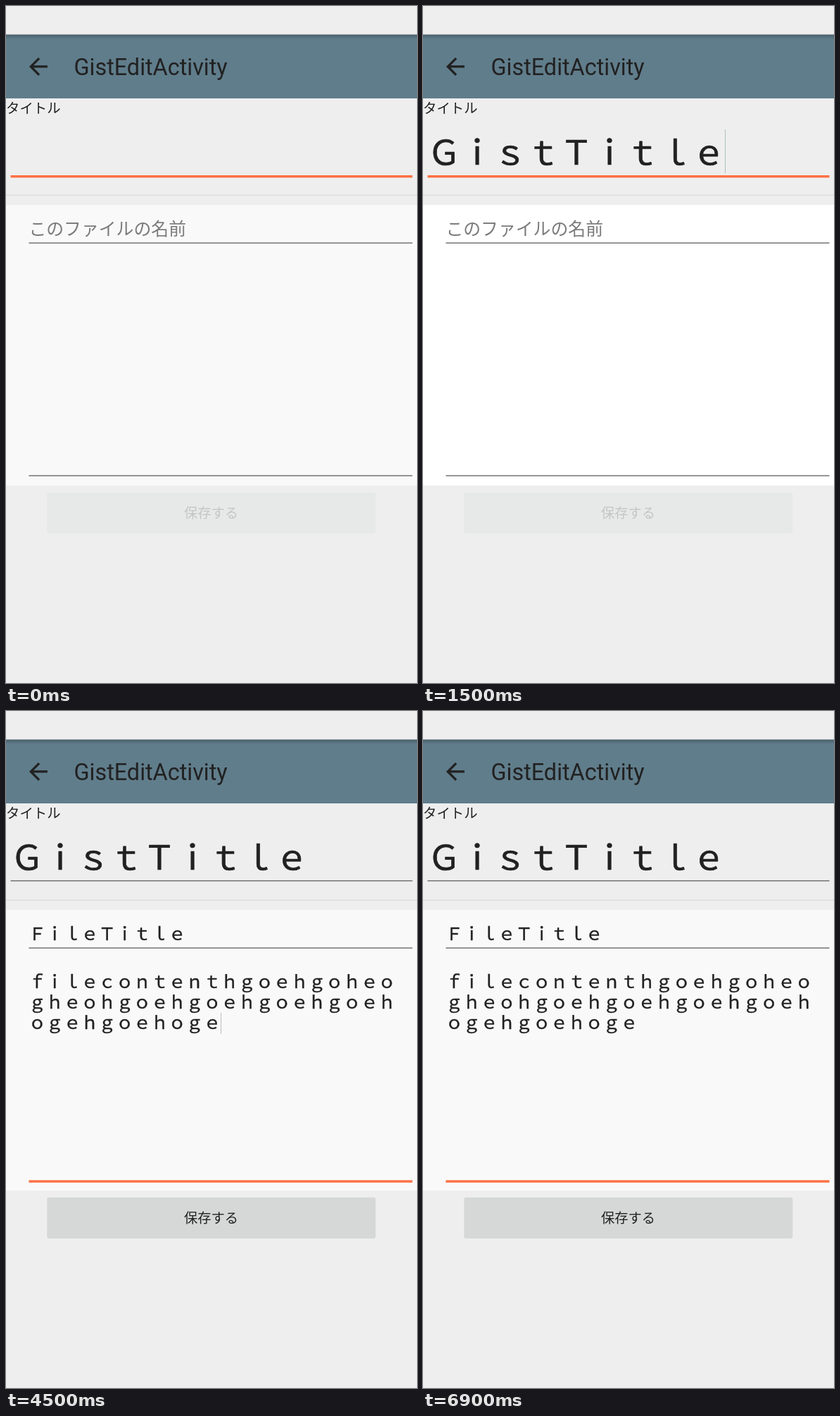
Animation, 584 px wide and 960 px high, one loop 7500 ms. Source, as an HTML page with a canvas:

```html
<!DOCTYPE html>
<html lang="ja">
<head>
<meta charset="utf-8">
<title>GistEditActivity</title>
<style>
html, body { margin: 0; width: 100%; height: 100%; overflow: hidden; background: #eee; }
canvas { display: block; }
</style>
</head>
<body>
<canvas id="stage" width="584" height="960"></canvas>
<script>
const ctx = document.getElementById('stage').getContext('2d');
const STEP = 1500;
const INK = '#212121', ACCENT = '#ff7043', RULE = '#747474';
const CJK = '"Noto Sans CJK JP", "Noto Sans CJK", sans-serif';
const BODY = ['filecontenthgoehgoheo', 'gheohgoehgoehgoehgoeh', 'ogehgoehoge'];

// Each step: focused field, caret box and card colour
const STEPS = [
  { focus: 'title', card: '#f9f9f9' },
  { focus: 'title', card: '#ffffff', title: true, caret: [429, 175, 62, '#adc0bb'] },
  { focus: 'file', card: '#ffffff', title: true, file: true, caret: [255, 298, 34, '#bdbdbd'] },
  { focus: 'body', card: '#f9f9f9', title: true, file: true, body: true, caret: [305, 428, 30, '#bdbdbd'] },
  { focus: 'body', card: '#f9f9f9', title: true, file: true, body: true }
];

function rect(x, y, w, h, color) {
  ctx.fillStyle = color;
  ctx.fillRect(x, y, w, h);
}

function text(str, x, y, size, color = INK, family = CJK) {
  ctx.font = `${size}px ${family}`;
  ctx.fillStyle = color;
  ctx.fillText(str, x, y);
}

// Typed letters are full-width, with slightly rounded strokes
function typed(str, x, y, size) {
  const wide = str.replace(/[!-~]/g, c => String.fromCharCode(c.charCodeAt(0) + 0xfee0));
  text(wide, x, y, size);
  ctx.strokeStyle = INK;
  ctx.lineJoin = 'round';
  ctx.lineWidth = size * 0.015;
  ctx.strokeText(wide, x, y);
}

function underline(x, y, focused) {
  rect(x, y, 577.5 - x, focused ? 3.4 : 1.5, focused ? ACCENT : RULE);
}

function appBar() {
  rect(0, 40.5, 584, 90.5, '#607d8b');
  const shade = ctx.createLinearGradient(0, 40, 0, 47);
  shade.addColorStop(0, 'rgba(0,0,0,.25)');
  shade.addColorStop(1, 'rgba(0,0,0,0)');
  rect(0, 40.5, 584, 6.5, shade);

  ctx.save();
  ctx.translate(26.5, 66.5);
  ctx.scale(1.622, 1.622);
  ctx.fillStyle = INK;
  ctx.fill(new Path2D('M20 11H7.83l5.59-5.59L12 4l-8 8 8 8 1.41-1.41L7.83 13H20z'));
  ctx.restore();

  for (const dy of [-9.7, 0, 9.7]) {
    ctx.beginPath();
    ctx.arc(554.8, 86 + dy, 3.25, 0, Math.PI * 2);
    ctx.fill();
  }
  text('GistEditActivity', 96.5, 98, 32.4, INK, 'Roboto, sans-serif');
}

function saveButton(enabled) {
  ctx.fillStyle = enabled ? '#d6d8d7' : '#e6e9e8';
  ctx.beginPath();
  ctx.roundRect(58.3, 689.7, 467, 58.2, 3);
  ctx.fill();
  text('保存する', 253, 726.3, 19.3, enabled ? INK : '#c4c6c5');
}

function draw(now) {
  const s = STEPS[Math.floor(now / STEP) % STEPS.length];
  rect(0, 0, 584, 960, '#eeeeee');
  appBar();

  text('タイトル', 0, 152, 19.4);
  if (s.title) typed('GistTitle', 6.5, 224.5, 47);
  underline(6.5, 240, s.focus === 'title');
  rect(0, 267.5, 584, 1.6, '#dedede');

  rect(0, 282, 584, 398, s.card);
  if (s.file) typed('FileTitle', 32, 325, 24.85);
  else text('このファイルの名前', 32.4, 325, 24.85, '#7b7b7b');
  underline(32.4, 335.3, s.focus === 'file');
  if (s.body) BODY.forEach((line, i) => typed(line, 32, 393 + i * 29.2, 24.85));
  underline(32.4, 665.3, s.focus === 'body');

  saveButton(s.body);
  if (s.caret) {
    const [x, y, h, color] = s.caret;
    rect(x, y, 1, h, color);
  }
}

let start;
function tick(now) {
  start ??= now;
  draw(Math.max(0, now - start));
  requestAnimationFrame(tick);
}
draw(0);
requestAnimationFrame(tick);
</script>
</body>
</html>
```
